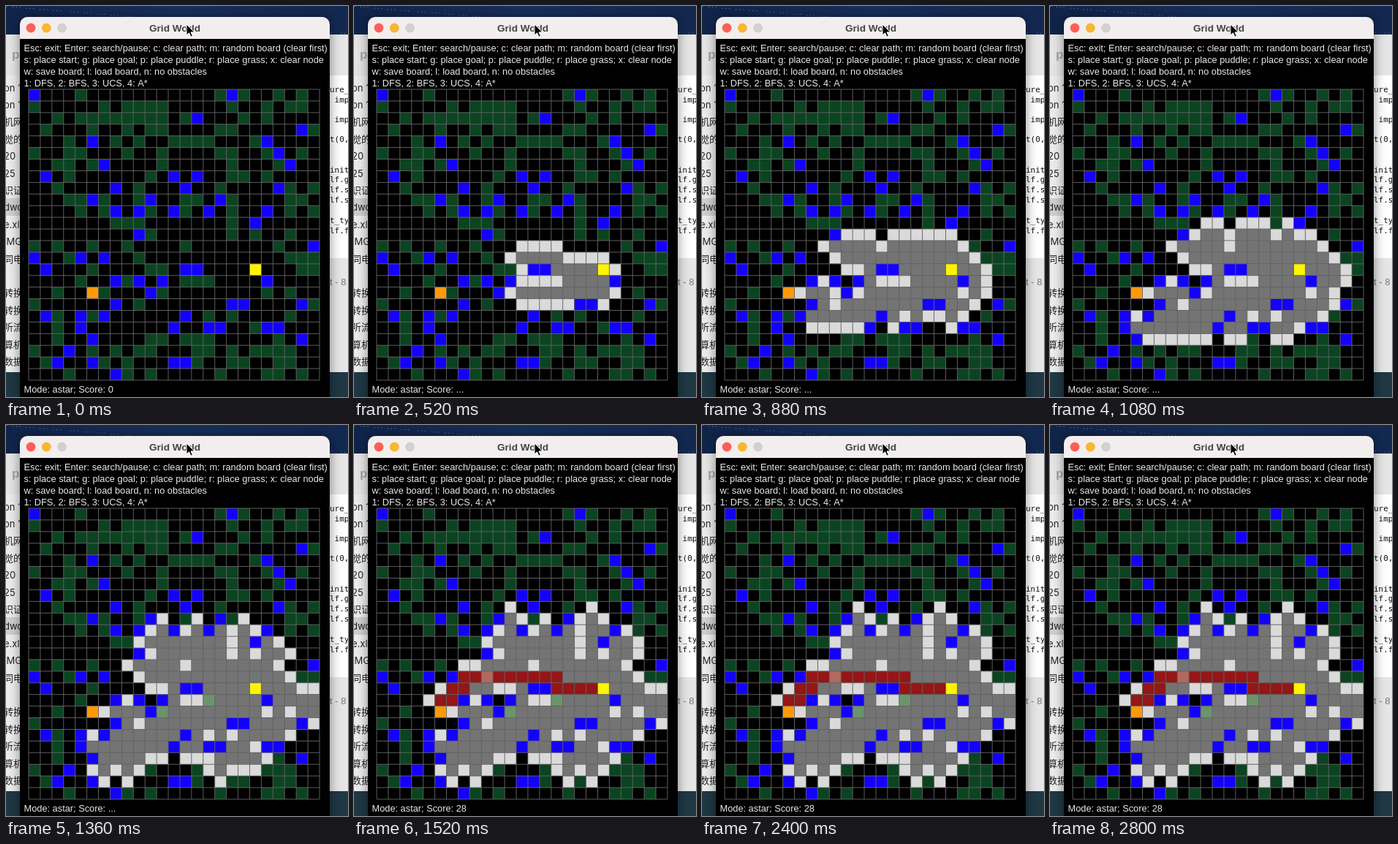
Write an HTML page with a canvas that moves like this. It is 468 px wide and 535 px high and loops after 3.46 s.

```html
<!DOCTYPE html>
<html lang="en">
<head>
<meta charset="utf-8">
<title>Grid World</title>
<style>
  html, body { margin: 0; width: 100%; height: 100%; overflow: hidden; background: #12264d; }
  canvas { display: block; }
</style>
</head>
<body>
<canvas id="stage" width="468" height="535"></canvas>
<script>
const ctx = document.getElementById('stage').getContext('2d');
const LOOP = 3460, TICK = 40, SEARCH_START = 350, MS_PER_NODE = 8.08;
const N = 25, CELL = 15.92, LEFT = 31, TOP = 114;
const SANS = '"Liberation Sans", Arial, sans-serif';
const CJK = 'Inter, "Noto Sans CJK SC", "Noto Sans CJK", sans-serif';
const MONO = '"DejaVu Sans Mono", monospace';

// b: puddle (blocked), g: grass, h: tall grass
const board = [
  'b...g...........gbg..g.g.',
  'g.....g.gggg.....g..g.gg.',
  '..g.gggggggg.gb...g.g....',
  '.g...g..g.gg....gg.....bg',
  '...g.b.g.g..gggg...gb....',
  'g..gg...g..g....gg..gb.g.',
  '..gg.gb....g.....g...gb..',
  '.b.g......g.b.b..gg.g....',
  '..g....b.g...b..g....bg.g',
  '...ggbg..gb..gg.bg....gg.',
  '....g.gb.bg.bg.b.g..b.g.g',
  '.......ggg.......g.b.....',
  '.........bg......g.g..g..',
  'g.g..g..g....g.......g..b',
  'b..gb.b..g............ggg',
  '.b...g....hh.bb........gg',
  '....g..bgb.b.hhg....b....',
  '..g...g...bg........g.g..',
  'g......b.g.......bb....bg',
  '.bg.bgb......b.g.g....g..',
  '..g.b.......b..bb..gbb...',
  '..g..b....gg.ggg.....g.b.',
  'g..b.g.g.gg...gg.g.gggg..',
  '.gb..bg.g...bbg..gg..gg..',
  '...g...bg.g.....g...gg.g.'
].join('');
const stepCost = { '.': 1, g: 11, h: 12 };
const start = 15 * N + 19, goal = 17 * N + 5;

// A*: ties are settled by reading order of the cells
function search() {
  const seen = { [start]: { id: start, g: 0, f: 0, opened: 0 } };
  const open = [seen[start]];
  let count = 0;
  while (open.length) {
    open.sort((a, b) => a.f - b.f || a.id - b.id);
    const node = open.shift();
    node.closed = ++count;
    if (node.id === goal) break;
    const col = node.id % N, row = Math.floor(node.id / N);
    for (const [dx, dy] of [[-1, 0], [1, 0], [0, -1], [0, 1]]) {
      const x = col + dx, y = row + dy, id = y * N + x;
      if (x < 0 || y < 0 || x >= N || y >= N || board[id] === 'b' || seen[id]) continue;
      const g = node.g + stepCost[board[id]];
      const h = Math.abs(x - goal % N) + Math.abs(y - Math.floor(goal / N));
      seen[id] = { id, g, f: g + h, opened: count, parent: node };
      open.push(seen[id]);
    }
  }
  const path = new Set();
  for (let n = seen[goal]; n; n = n.parent) path.add(n.id);
  return { seen, path, count, score: seen[goal].g };
}
const result = search();

function rect(x, y, w, h, color) {
  ctx.fillStyle = color;
  ctx.fillRect(x, y, w, h);
}

function text(str, x, y, font, color, align = 'left') {
  ctx.font = font;
  ctx.fillStyle = color;
  ctx.textAlign = align;
  ctx.fillText(str, x, y);
}

function drawDesktop() {
  const sky = ctx.createLinearGradient(0, 0, 468, 0);
  sky.addColorStop(0, '#10244a');
  sky.addColorStop(0.5, '#17305c');
  sky.addColorStop(1, '#122850');
  rect(0, 0, 468, 535, sky);
  for (let i = 0; i < 70; i++) rect(i * 97.3 % 468, i * 7.7 % 37, 1.2, 1.2, '#5a7298');
  rect(0, 501, 468, 34, '#1f3844');

  rect(0, 39, 468, 462, '#e6e6e6');
  rect(0, 95, 19, 406, '#ededed');
  rect(0, 263, 19, 24, '#d0d0d0');
  text('p', 8, 72, 'bold 17px ' + SANS, '#a5a5a5');
  const files = ['on 1.', 'on 1.', '机网络', '觉的', '20', '25', '识证', 'dwo',
    'e.xls', 'IMG', '同电', '', '转换', '转换', '听流', '算机', '数据'];
  files.forEach((name, i) => text(name, -3, 116.5 + i * 23.4, '13px ' + CJK, '#222'));

  rect(443, 95, 25, 250, '#fff');
  const code = [['ure_', 118], [' imp', 132], [' imp', 159], ['t(0,', 186], ['init_', 228],
    ['lf.g', 241], ['lf.s', 255], ['lf.s', 269], ['t_ty', 297], ['lf.f', 311]];
  for (const [line, y] of code) text(line, 443, y, '11px ' + MONO, '#111');
  text('t - 8', 443, 382, '13px ' + SANS, '#777');
}

function drawWindow() {
  ctx.save();
  ctx.shadowColor = 'rgba(0,0,0,.45)';
  ctx.shadowBlur = 16;
  ctx.fillStyle = '#000';
  ctx.beginPath();
  ctx.roundRect(19, 15, 424, 540, 10);
  ctx.fill();
  ctx.restore();
  ctx.fillStyle = '#f3eeee';
  ctx.beginPath();
  ctx.roundRect(19, 15, 424, 30, [10, 10, 0, 0]);
  ctx.fill();
  ['#fe5f57', '#f9b632', '#d3d0d0'].forEach((color, i) => {
    ctx.fillStyle = color;
    ctx.beginPath();
    ctx.arc(34 + i * 21.3, 30, 6.4, 0, 7);
    ctx.fill();
  });
  text('Grid World', 231, 34.5, 'bold 13.6px ' + SANS, '#454343', 'center');
  [
    'Esc: exit; Enter: search/pause; c: clear path; m: random board (clear first)',
    's: place start; g: place goal; p: place puddle; r: place grass; x: clear node',
    'w: save board; l: load board, n: no obstacles',
    '1: DFS, 2: BFS, 3: UCS, 4: A*'
  ].forEach((line, i) => text(line, 24.5, 62 + i * 16, '12.8px ' + SANS, '#e8e8e8'));
}

function cellColor(id, count, done) {
  if (id === start) return '#fff500';
  if (id === goal) return '#ff990a';
  const kind = board[id], node = result.seen[id], grass = kind !== '.';
  if (kind === 'b') return '#1400ff';
  if (done && result.path.has(id)) return grass ? '#b06a60' : '#941616';
  if (node && node.closed <= count) return grass ? '#6b946b' : '#747474';
  if (node && count && node.opened <= count) return '#dadada';
  return grass ? '#0b4421' : '#000';
}

function drawBoard(count, done) {
  for (let id = 0; id < N * N; id++) {
    const x = LEFT + id % N * CELL, y = TOP + Math.floor(id / N) * CELL;
    rect(x, y, CELL, CELL, cellColor(id, count, done));
  }
  ctx.strokeStyle = '#686868';
  ctx.lineWidth = 0.9;
  ctx.beginPath();
  for (let i = 0; i <= N; i++) {
    const d = i * CELL, end = N * CELL;
    ctx.moveTo(LEFT + d, TOP);
    ctx.lineTo(LEFT + d, TOP + end);
    ctx.moveTo(LEFT, TOP + d);
    ctx.lineTo(LEFT + end, TOP + d);
  }
  ctx.stroke();
}

function drawCursor() {
  ctx.fillStyle = '#000';
  ctx.strokeStyle = '#fff';
  ctx.lineWidth = 1;
  const arrow = new Path2D('M247 25v15l3.5-3.2 2.5 5.4 2.4-1.1-2.4-5.2h4.8z');
  ctx.fill(arrow);
  ctx.stroke(arrow);
}

function draw(now) {
  const time = Math.floor(now % LOOP / TICK) * TICK;
  const count = Math.max(0, Math.floor((time - SEARCH_START) / MS_PER_NODE));
  const done = count >= result.count;
  const score = done ? result.score : count ? '...' : 0;
  drawDesktop();
  drawWindow();
  drawBoard(Math.min(count, result.count), done);
  text('Mode: astar; Score: ' + score, 24.5, 529, '12.8px ' + SANS, '#e8e8e8');
  drawCursor();
}

const origin = performance.now();
function frame() {
  draw(performance.now() - origin);
  requestAnimationFrame(frame);
}
frame();
</script>
</body>
</html>
```
